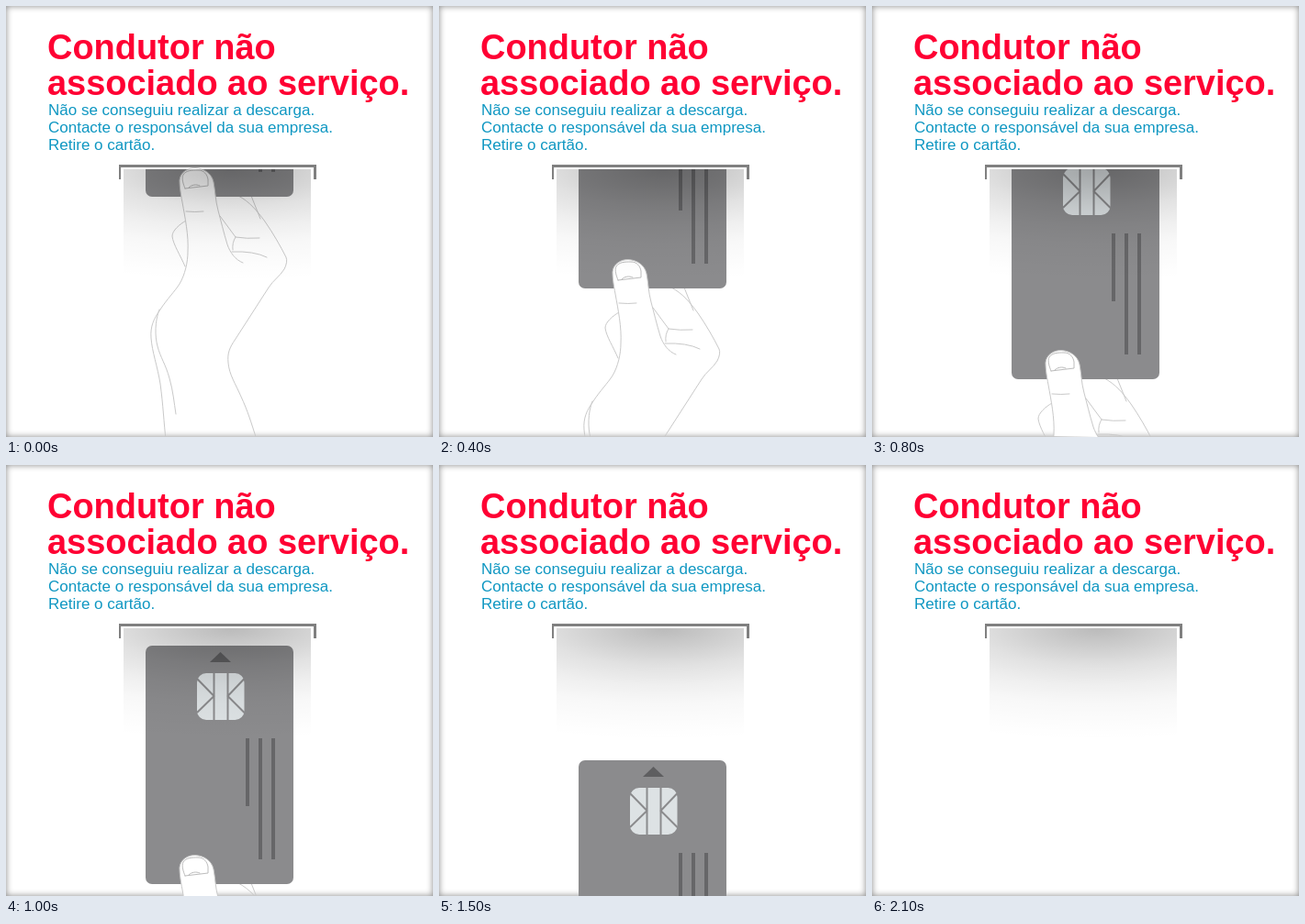
Animation, 465 px wide and 470 px high, one loop 2.2 s. Source, as an HTML page without scripts:

```html
<!DOCTYPE html>
<html lang="pt">
<head>
<meta charset="utf-8">
<title>Retire o cartão</title>
<style>
html, body { margin: 0; width: 100%; height: 100%; overflow: hidden; background: #fff; }
.stage { position: relative; width: 465px; height: 470px; overflow: hidden; }
.stage svg, .layer { position: absolute; left: 0; top: 0; width: 465px; height: 470px; }
.stage svg { display: block; overflow: visible; }
.vignette { box-shadow: inset 0 0 7px rgba(0, 0, 0, .48); }
.slot { clip-path: inset(178px 0 0 0); }
.title { font: bold 37.95px "Liberation Sans", Arial, sans-serif; fill: #ff0033; }
.note { font: 17px "Liberation Sans", Arial, sans-serif; fill: #0f97c2; }
.line { fill: none; stroke: #c9c9c9; stroke-width: 1; stroke-linecap: round; stroke-linejoin: round; }
.stage .slide { animation: slide 2.2s steps(22, end) infinite; }
@keyframes slide { from { top: 0; } to { top: 547.8px; } }
</style>
</head>
<body>
<div class="stage">
  <div class="layer vignette"></div>

  <svg viewBox="0 0 465 470">
    <g class="title">
      <text x="45" y="58">Condutor não</text>
      <text x="45" y="97">associado ao serviço.</text>
    </g>
    <g class="note">
      <text x="46" y="119">Não se conseguiu realizar a descarga.</text>
      <text x="46" y="138">Contacte o responsável da sua empresa.</text>
      <text x="46" y="157">Retire o cartão.</text>
    </g>
    <path d="M123 173H338V189H335V176H125V189H123Z" fill="#808080"/>
  </svg>

  <!-- palm and fingers behind the card -->
  <svg class="slide line" viewBox="0 0 465 470">
    <path d="M253 207C265 213 274 224 282 235C291 248 299 262 305 274Q307 279 303 287C298 295 291 299 286 307L250 363C243 373 241 379 242 389C243 402 250 412 256 426C263 441 267 454 273 473"/>
    <path d="M267 207L277 232"/>
    <path d="M233 229L250 252Q262 254 276 253M250 252Q246 258 247 266M246 268Q270 267 284 274"/>
    <path d="M196 234C189 238 181 245 181 251C182 260 190 272 195 284"/>
  </svg>

  <div class="layer slot">
    <svg class="slide" viewBox="0 0 465 470">
      <g transform="translate(0 -52)">
        <rect x="152" width="161" height="260" rx="7" fill="#8b8b8d"/>
        <path d="M222 18L233.500 7L245 18Z" fill="#5e5e60"/>
        <rect x="208" y="30" width="51.500" height="51" rx="10" fill="#dde2e4"/>
        <path d="M226.500 30V81M241.500 30V81M208 36L226.500 55L208 73M259.500 36L241.500 55L259.500 73" fill="none" stroke="#8b8b8d" stroke-width="2"/>
        <path d="M263 101V175M277 101V233M291 101V233" stroke="#666668" stroke-width="4"/>
      </g>
    </svg>
  </div>

  <!-- thumb in front of the card -->
  <svg class="slide" viewBox="0 0 465 470">
    <path d="M198 270C199 250 195 231 192 214C190 204 189 196 189 190C190 181 198 176.500 206 176.500C215 177 224 182 226 192C228 202 228 212 231 223C235 238 237 260 246 271Z" fill="#fff"/>
    <g class="line">
      <path d="M258 280C250 277 244 269 241 260C237 247 234 234 231 223C228 212 228 202 226 192C224 182 215 177 206 176.500C198 176.500 190 181 189 190C189 196 190 204 192 214C195 231 199 250 198 268C198 279 195 293 189 303C184 311 175 320 168 331C161 341 157 349 158 362C159 377 165 393 168 412C171 434 172 455 174 473"/>
      <path d="M167 331C162 344 162 360 165 371C168 383 174 391 178 406C182 420 183 432 185 445"/>
      <path d="M196 224Q206 225 215 224"/>
      <path d="M195 199C193 194 191 188 193 184C196 179 203 179 209 179C216 179 219 184 220 189V196L195 199M199 198C202 195 207 194 211 196" stroke="#bcbcbc"/>
    </g>
  </svg>

  <svg viewBox="0 0 465 470">
    <defs>
      <radialGradient id="shade" gradientUnits="userSpaceOnUse" cx="0" cy="0" r="1" gradientTransform="translate(245 178) scale(390 122)">
        <stop offset="0" stop-opacity=".27"/>
        <stop offset=".18" stop-opacity=".19"/>
        <stop offset=".34" stop-opacity=".117"/>
        <stop offset=".51" stop-opacity=".063"/>
        <stop offset=".67" stop-opacity=".029"/>
        <stop offset=".9" stop-opacity=".007"/>
        <stop offset="1" stop-opacity="0"/>
      </radialGradient>
    </defs>
    <rect x="128" y="178" width="204" height="122" fill="url(#shade)"/>
  </svg>
</div>
</body>
</html>
```
